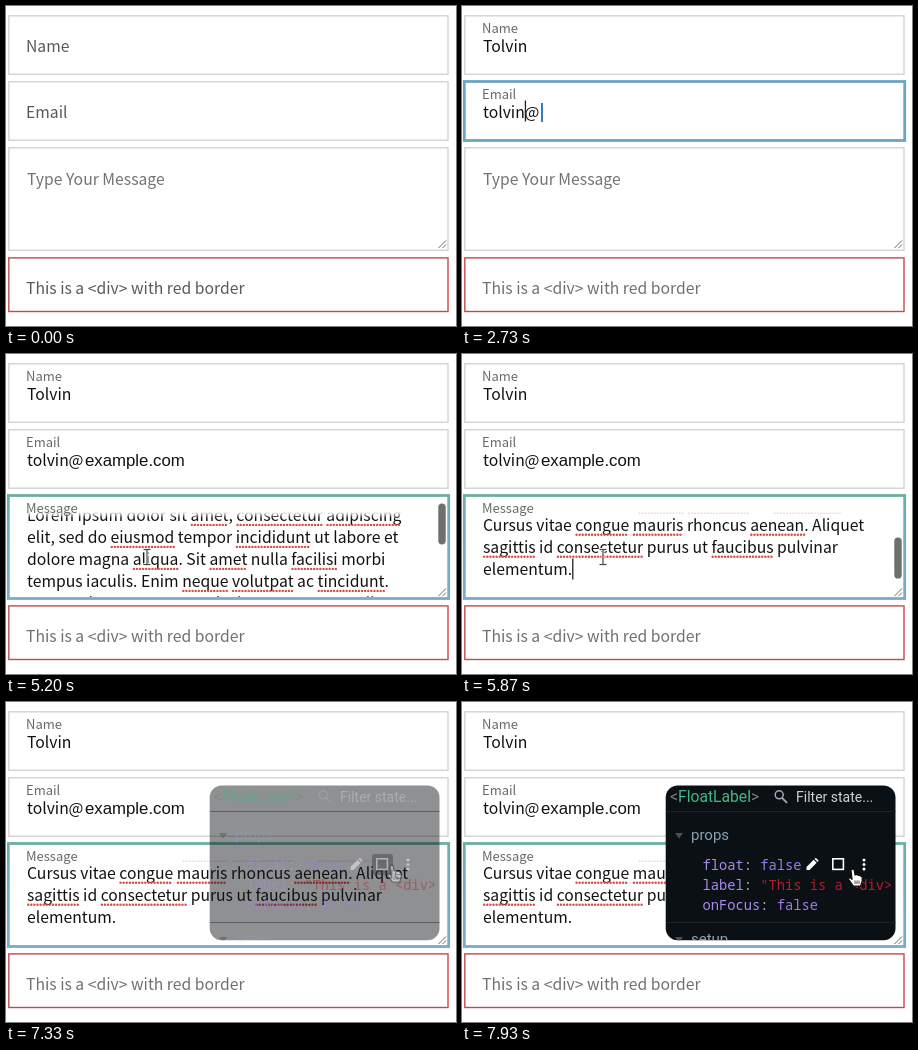
Write an HTML page with a canvas that moves like this. It is 450 by 320 pixels and loops after 8 s.

```html
<!DOCTYPE html>
<html lang="en">
<head>
<meta charset="utf-8">
<title>Floating labels</title>
<style>
html, body { margin: 0; width: 100%; height: 100%; overflow: hidden; background: #fff; }
canvas { display: block; width: 450px; height: 320px; }
</style>
</head>
<body>
<canvas id="stage"></canvas>
<script>
const canvas = document.getElementById('stage');
const dpr = window.devicePixelRatio || 1;
canvas.width = 450 * dpr;
canvas.height = 320 * dpr;
const c = canvas.getContext('2d');

const SANS = '"Noto Sans CJK JP", "Noto Sans CJK SC", "Noto Sans CJK", "Noto Sans", sans-serif';
const HELV = '"Liberation Sans", Arial, sans-serif';
const ROBOTO = 'Roboto, sans-serif';
const MONO = '"Noto Sans Mono", "DejaVu Sans Mono", monospace';
const SIZE = 15.73, SMALL = 13;
const LOOP = 8000;

// Words between underscores are marked by the spell checker.
const LINES = [
  'Lorem ipsum dolor sit _amet_, _consectetur_ _adipiscing_',
  'elit, sed do _eiusmod_ tempor _incididunt_ ut labore et',
  'dolore magna _aliqua_. Sit _amet_ nulla _facilisi_ morbi',
  'tempus iaculis. Enim _neque_ _volutpat_ ac _tincidunt_.',
  'Cursus vitae _congue_ _mauris_ rhoncus _aenean_. Aliquet',
  '_sagittis_ id _consectetur_ purus ut _faucibus_ pulvinar',
  'elementum.'
];

const clamp = x => Math.max(0, Math.min(1, x));
const ramp = (t, from, to) => clamp((t - from) / (to - from));
const smooth = x => x * x * (3 - 2 * x);
const mix = (a, b, k) => a + (b - a) * k;
const typed = (str, t, start, step) =>
  str.slice(0, t < start ? 0 : Math.floor((t - start) / step) + 1);

// Draws text and returns the x position of its end.
function text(str, x, y, color, size = SIZE, font = SANS) {
  c.font = size + 'px ' + font;
  c.fillStyle = color;
  c.fillText(str, x, y);
  return x + c.measureText(str).width;
}

function rect(x, y, w, h, color) {
  c.fillStyle = color;
  c.fillRect(x, y, w, h);
}

function round(x, y, w, h, r, color) {
  c.beginPath();
  c.roundRect(x, y, w, h, r);
  c.fillStyle = color;
  c.fill();
}

function poly(points, fill, stroke, width = 1) {
  c.beginPath();
  points.forEach(([x, y]) => c.lineTo(x, y));
  c.closePath();
  if (fill) { c.fillStyle = fill; c.fill(); }
  if (stroke) { c.strokeStyle = stroke; c.lineWidth = width; c.stroke(); }
}

function line(x1, y1, x2, y2, color, width = 1) {
  c.beginPath();
  c.moveTo(x1, y1);
  c.lineTo(x2, y2);
  c.strokeStyle = color;
  c.lineWidth = width;
  c.stroke();
}

function frame(x, y, w, h, color, width = 1.4) {
  c.strokeStyle = color;
  c.lineWidth = width;
  c.strokeRect(x, y, w, h);
}

function field(y, h, focus) {
  if (!focus) return frame(2.8, y, 439.2, h, '#d3d3d3');
  let color = '#6aa6c4';
  if (focus === 'teal') {
    color = c.createLinearGradient(0, y, 0, y + h);
    color.addColorStop(0, '#6aafa3');
    color.addColorStop(0.25, '#74a9c4');
    color.addColorStop(1, '#7aabca');
  }
  frame(2.3, y - 0.3, 440.4, h + 0.6, color, 2.8);
}

const caret = (x, y) => rect(x, y, 1.3, 21, '#222');

function beam(x, y) {
  for (const [color, width] of [['#fff', 3], ['#444', 1.2]]) {
    line(x, y - 7, x, y + 7, color, width);
    line(x - 3.5, y - 7.5, x + 3.5, y - 7.5, color, width);
    line(x - 3.5, y + 7.5, x + 3.5, y + 7.5, color, width);
  }
}

function nameField(t) {
  const focus = t >= 470 && t < 1870;
  const value = typed('Tolvin', t, 1400, 66);
  field(9.8, 58.4, focus);
  let end = 21.5;
  if (value) {
    text('Name', 20, 27, '#686868', SMALL);
    end = text(value, 21, 45.5, '#111');
  } else {
    text('Name', 20, 46, '#585858');
  }
  if (focus && (t < 930 || t >= 1400)) caret(end, 29);
}

function emailField(t) {
  const focus = t >= 1870 && t < 3730;
  const user = typed('tolvin', t, 2330, 66);
  field(75.8, 58.4, focus);
  let end = 21.5;
  if (user) {
    text('Email', 20, 92.5, '#686868', SMALL);
    end = text(user, 21, 111.5, '#111');
  } else {
    text('Email', 20, 112, '#585858');
  }
  if (focus && t < 3000) caret(end, 94.5);
  if (t < 2726) return;
  text('@', 62.6, 111.5, '#111');
  const host = typed('exam', t, 2870, 86) + typed('ple.com', t, 3270, 76);
  const hostEnd = text(host, 79, 112, '#111', 16.8, HELV);
  if (t < 3930) rect(hostEnd, 97, 2, 19, '#2c7fc0');
}

function paragraph(t, scroll) {
  c.save();
  c.beginPath();
  c.rect(4, 158, 426, 85);
  c.clip();
  let end = 21;
  LINES.forEach((str, i) => {
    const y = 179 + 22 * i - scroll;
    end = 21;
    str.split('_').forEach((part, k) => {
      const from = end;
      end = text(part, from, y, '#111');
      if (k % 2 === 0) return;
      for (let x = from + 1.2; x < end; x += 3.1) {
        c.beginPath();
        c.arc(x, y + 4.3, 1.2, 0, 7);
        c.fillStyle = '#df4a45';
        c.fill();
      }
    });
  });
  if ((t - 5545 + LOOP * 930) % 930 < 465) caret(end, 312 - 17 - scroll);
  const veil = c.createLinearGradient(0, 158, 0, 164);
  veil.addColorStop(0, '#fff');
  veil.addColorStop(1, 'rgba(255,255,255,0)');
  rect(4, 158, 426, 6, veil);
  c.restore();
}

function messageField(t) {
  const focus = t >= 3730;
  field(141.8, 102.4, focus && 'teal');
  if (t < 4400) {
    text('Type Your Message', 21, 179, '#727272');
    if (focus && t < 4270) caret(21.5, 162);
  } else {
    const up = smooth(ramp(t, 4530, 4950));
    const down = smooth(ramp(t, 5050, 5700));
    const scroll = 90.5 * (1 - up + down);
    paragraph(t, scroll);
    text('Message', 20, 158.5, '#686868', SMALL);
    c.globalAlpha = 1 - ramp(t, 6250, 6500);
    round(432.3, 144 + 0.4375 * scroll, 7.4, 41, 3.7, '#6f6f6f');
    c.globalAlpha = 1;
  }
  line(432.5, 242, 440, 234.5, '#666');
  line(436.5, 242, 440, 238.5, '#666');
}

function hand(x, y) {
  const shape = [[-4, -8], [-2.2, -9], [-0.8, -8], [0, -3.2], [2, -3.6], [3.2, -2.6],
    [5, -2.8], [6, -1.6], [7.2, -1], [7.2, 3], [5.6, 8], [-1.6, 8], [-6.4, 1.4],
    [-6, -0.2], [-4.4, 0], [-3, 1.4]];
  c.lineJoin = 'round';
  poly(shape.map(([a, b]) => [x + a, y + b]), '#fff', '#111', 1.2);
  for (const dx of [0, 2, 4]) line(x + dx, y + 2.5, x + dx, y + 6, '#222', 0.8);
  c.lineJoin = 'miter';
}

function row(key, value, y, color) {
  const keyEnd = text(key, 240.5, y, '#a98bf0', 13.75, MONO);
  const sepEnd = text(': ', keyEnd, y, '#b9bec4', 13.75, MONO);
  text(value, sepEnd, y, color, 13.75, MONO);
}

function section(label, y) {
  poly([[213, y - 7], [221, y - 7], [217, y - 1.5]], '#4a5056');
  text(label, 229, y, '#8aa2b5', 15, ROBOTO);
}

function panel(t) {
  const alpha = ramp(t, 6930, 7800);
  if (!alpha) return;
  c.save();
  c.globalAlpha = alpha;
  round(203.7, 83.5, 229.8, 154.7, 12, '#0b1015');
  c.clip();

  let x = text('<', 208, 100, '#77837f', 15.7, ROBOTO);
  x = text('FloatLabel', x, 100, '#42b883', 15.7, ROBOTO);
  text('>', x, 100, '#77837f', 15.7, ROBOTO);
  c.beginPath();
  c.arc(317.2, 92.8, 4, 0, 7);
  c.strokeStyle = '#a4abb2';
  c.lineWidth = 1.5;
  c.stroke();
  line(320, 95.8, 325, 100.8, '#a4abb2', 1.8);
  text('Filter state...', 334, 99.5, '#cdd2d7', 14, ROBOTO);
  line(204, 109.5, 434, 109.5, '#1d2329');
  line(204, 220.5, 434, 220.5, '#1d2329');

  section('props', 138);
  row('float', 'false', 168, '#9a7cf0');
  c.save();
  c.beginPath();
  c.rect(204, 110, 227.5, 110);
  c.clip();
  row('label', '"This is a <div> with red border"', 188, '#b0202a');
  c.restore();
  row('onFocus', 'false', 208, '#9a7cf0');
  section('setup', 242);

  if (t < 7600) round(366, 152, 21, 21, 3, '#39424b');
  poly([[344.5, 168], [344.5, 165], [351.7, 157.8], [354.7, 160.8], [347.5, 168]], '#fff');
  poly([[352.6, 156.9], [353.8, 155.8], [356.7, 158.7], [355.6, 159.9]], '#fff');
  frame(370.8, 156.8, 10.6, 10.6, '#fff', 1.6);
  for (const y of [158, 162.5, 167]) {
    c.beginPath();
    c.arc(402, y, 1.5, 0, 7);
    c.fillStyle = '#fff';
    c.fill();
  }
  const k = smooth(ramp(t, 7400, 7800));
  hand(mix(388, 393, k), mix(172, 176, k));
  c.restore();
}

function pointer(t) {
  if (t >= 70 && t < 1400) {
    const k = smooth(ramp(t, 30, 330));
    beam(mix(125, 111, k), mix(-8, 26, k));
  } else if (t >= 4500 && t < 6870) {
    const k = smooth(ramp(t, 6000, 6700));
    beam(mix(141, 152, k), mix(203, 279, k));
  }
}

function draw() {
  const t = performance.now() % LOOP;
  c.setTransform(dpr, 0, 0, dpr, 0, 0);
  rect(0, 0, 450, 320, '#fff');
  nameField(t);
  emailField(t);
  messageField(t);
  frame(2.8, 251.9, 439.2, 53.6, '#c4494b', 1.4);
  text('This is a <div> with red border', 20, 288, t < 470 ? '#585858' : '#707070');
  pointer(t);
  panel(t);
  requestAnimationFrame(draw);
}
draw();
</script>
</body>
</html>
```
